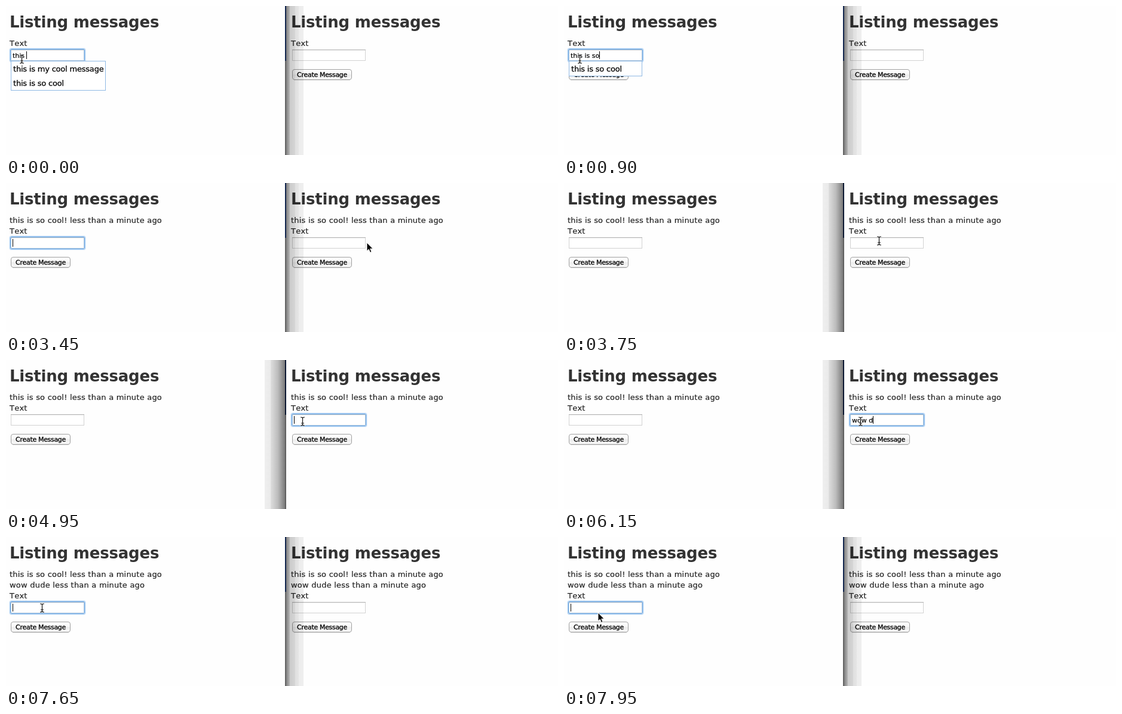
An HTML page for the animation above (8000 ms loop, 924 px wide and 250 px high).

```html
<!DOCTYPE html>
<html lang="en">
<head>
<meta charset="utf-8">
<title>Listing messages</title>
<style>
  html, body { margin: 0; width: 100%; height: 100%; overflow: hidden; background: #fefefe; }
  svg { display: block; width: 924px; height: 250px; }
  text { font: 13px "DejaVu Sans", sans-serif; font-kerning: none; white-space: pre; fill: #222; stroke: #222; stroke-width: .2px; letter-spacing: .22px; }
  .title { font-size: 26px; font-weight: bold; letter-spacing: -.2px; fill: #333; stroke: none; }
  .typed, .label { font-size: 11px; letter-spacing: 0; fill: #000; stroke: #000; }
  .label { letter-spacing: -.33px; text-anchor: middle; stroke-width: .3px; }
  .row { letter-spacing: -.2px; fill: #000; stroke: #000; stroke-width: .25px; }
  .field { fill: #fff; stroke: #d2d2d2; }
  .ring rect { fill: none; stroke: #74aee9; }
  .button { fill: url(#face); stroke: #a0a0a0; }
  .menu rect { fill: #fff; stroke: #8fb9e4; }
</style>
</head>
<body>
<svg viewBox="0 0 924 250">
  <defs>
    <linearGradient id="face" x2="0" y2="1">
      <stop offset="0" stop-color="#fff"/>
      <stop offset=".5" stop-color="#f6f6f6"/>
      <stop offset=".5" stop-color="#ececec"/>
      <stop offset="1" stop-color="#fafafa"/>
    </linearGradient>
    <linearGradient id="toRight">
      <stop offset="0" stop-opacity=".5"/>
      <stop offset=".22" stop-opacity=".27"/>
      <stop offset=".22" stop-opacity=".2"/>
      <stop offset=".52" stop-opacity=".16"/>
      <stop offset=".52" stop-opacity=".12"/>
      <stop offset=".72" stop-opacity=".1"/>
      <stop offset=".72" stop-opacity=".07"/>
      <stop offset="1" stop-opacity=".06"/>
    </linearGradient>
    <linearGradient id="toLeft">
      <stop offset="0" stop-opacity=".06"/>
      <stop offset=".28" stop-opacity=".08"/>
      <stop offset=".28" stop-opacity=".12"/>
      <stop offset=".65" stop-opacity=".26"/>
      <stop offset="1" stop-opacity=".52"/>
    </linearGradient>
  </defs>

  <g id="panes"></g>

  <g id="leftFront">
    <rect x="467" width="2" height="92" fill="#12264e"/>
    <rect x="467" y="92" width="2" height="158" fill="#666"/>
    <rect x="469" width="29" height="250" fill="url(#toRight)"/>
  </g>
  <g id="rightFront">
    <rect x="433" width="34" height="250" fill="url(#toLeft)"/>
    <rect x="467" width="2" height="92" fill="#0c1832"/>
    <rect x="467" y="92" width="2" height="158" fill="#626262"/>
  </g>

  <g id="beam" fill="none" stroke-linecap="round">
    <path id="beamShape" d="M-3-7Q0-7 0-5V5Q0 7-3 7M3-7Q0-7 0-5M3 7Q0 7 0 5M-2 3H2" stroke="#fff" stroke-opacity=".7" stroke-width="2.6"/>
    <path d="M-3-7Q0-7 0-5V5Q0 7-3 7M3-7Q0-7 0-5M3 7Q0 7 0 5M-2 3H2" stroke="#111" stroke-width="1.2"/>
  </g>
  <path id="arrow" d="M0 0V14.2L3.3 11.2 5.6 16.6 8 15.6 5.7 10.3H10.2Z" stroke="#fff"/>
</svg>

<script>
const LOOP = 8000;
const $ = id => document.getElementById(id);
const show = (el, on) => { el.style.display = on ? '' : 'none'; };
const move = (el, x, y) => el.setAttribute('transform', `translate(${x} ${y})`);

// Focus glow: [distance outside the field, opacity].
const ring = [[-.5, .4], [.5, .95], [1.5, .6], [2.5, .15]].map(([d, o]) =>
  `<rect x="${8 - d}" y="${73 - d}" width="${123 + 2 * d}" height="${19 + 2 * d}" rx="${d + .5}" opacity="${o}"/>`).join('');

function makePane(x) {
  const g = document.createElementNS('http://www.w3.org/2000/svg', 'g');
  move(g, x, 0);
  g.innerHTML = `
    <text class="title" x="6" y="36">Listing messages</text>
    <text class="post" x="6" y="67">this is so cool! less than a minute ago</text>
    <text class="post" x="6" y="85">wow dude less than a minute ago</text>
    <g class="form">
      <text x="6" y="67">Text</text>
      <rect class="field" x="8.5" y="73.5" width="122" height="18"/>
      <path d="M8 73.5H131" stroke="#b4b4b4"/>
      <path d="M9 74.5H130" stroke="#f0f0f0"/>
      <g class="ring">${ring}</g>
      <text class="typed" x="11" y="87"></text>
      <rect class="caret" y="76" width="1" height="13"/>
      <path d="M11 124.5H105" stroke="#000" stroke-opacity=".12"/>
      <rect class="button" x="8.5" y="106.5" width="99" height="17" rx="3.5"/>
      <text class="label" x="58" y="119">Create Message</text>
      <g class="menu">
        <rect x="8.5" y="92.5"/>
        <text class="row" x="12" y="110"></text>
        <text class="row" x="12" y="134">this is so cool</text>
      </g>
    </g>`;
  $('panes').append(g);
  const one = name => g.querySelector('.' + name);
  return {
    posts: g.querySelectorAll('.post'), rows: g.querySelectorAll('.row'),
    box: g.querySelector('.menu rect'), form: one('form'), ring: one('ring'),
    typed: one('typed'), caret: one('caret'), menu: one('menu')
  };
}
const panes = [makePane(0), makePane(471)];

// Each step patches the state; mouse is [x, y, isArrow].
const steps = [
  [0, { front: 0, focus: true, caret: true, text: 'this ', menu: 2, posts: 0, mouse: [26.5, 89] }],
  [150, { text: 'this i' }],
  [450, { text: 'this is' }],
  [600, { text: 'this is ' }],
  [900, { text: 'this is so', menu: 1 }],
  [1200, { text: 'this is so ' }],
  [1350, { text: 'this is so co' }],
  [1500, { text: 'this is so coo' }],
  [1650, { text: 'this is so cool' }],
  [1950, { text: 'this is so cool!', menu: 0 }],
  [2400, { text: '', posts: 1 }],
  [2850, { caret: false }],
  [3150, { mouse: [120, 94, true] }],
  [3300, { mouse: [390, 96, true], caret: true }],
  [3450, { mouse: [604, 100, true] }],
  [3600, { mouse: [540.5, 98] }],
  [3750, { mouse: [527.5, 97], front: 1, focus: false }],
  [4050, { mouse: [518, 112, true] }],
  [4200, { mouse: [505, 113, true] }],
  [4500, { mouse: [499.5, 106] }],
  [4650, { mouse: [496.5, 103] }],
  [4800, { focus: true }],
  [5250, { text: 'w' }],
  [5400, { text: 'wo' }],
  [5700, { text: 'wow' }],
  [6000, { text: 'wow ' }],
  [6150, { text: 'wow d' }],
  [6300, { text: 'wow du' }],
  [6450, { text: 'wow dud' }],
  [6600, { text: 'wow dude' }],
  [6750, { text: '', posts: 2 }],
  [7200, { mouse: [425, 108, true] }],
  [7350, { mouse: [210, 115, true] }],
  [7500, { mouse: [70.5, 119] }],
  [7650, { mouse: [60.5, 119], front: 0 }],
  [7800, { mouse: [58, 124, true] }],
  [7950, { mouse: [57, 127, true] }]
];

function drawPane(pane, state, active) {
  const focused = active && state.focus;
  const rows = focused ? state.menu : 0;
  pane.posts.forEach((post, i) => show(post, i < state.posts));
  move(pane.form, 0, 18 * state.posts);
  show(pane.ring, focused);
  pane.typed.textContent = focused ? state.text : '';
  show(pane.caret, focused && state.caret);
  const width = focused && state.text ? pane.typed.getComputedTextLength() : 0;
  pane.caret.setAttribute('x', Math.floor(11 + width));
  show(pane.menu, rows > 0);
  pane.box.setAttribute('width', rows > 1 ? 158 : 122);
  pane.box.setAttribute('height', rows > 1 ? 49 : 25);
  pane.rows[0].textContent = rows > 1 ? 'this is my cool message' : 'this is so cool';
  show(pane.rows[1], rows > 1);
}

function draw(time) {
  const state = {};
  for (const [at, patch] of steps) if (at <= time) Object.assign(state, patch);
  panes.forEach((pane, i) => drawPane(pane, state, i === state.front));
  show($('leftFront'), state.front === 0);
  show($('rightFront'), state.front === 1);
  const [x, y, isArrow] = state.mouse;
  show($('beam'), !isArrow);
  show($('arrow'), isArrow);
  move($(isArrow ? 'arrow' : 'beam'), x, y);
}

function tick() {
  draw(performance.now() % LOOP);
  requestAnimationFrame(tick);
}
tick();
</script>
</body>
</html>
```
